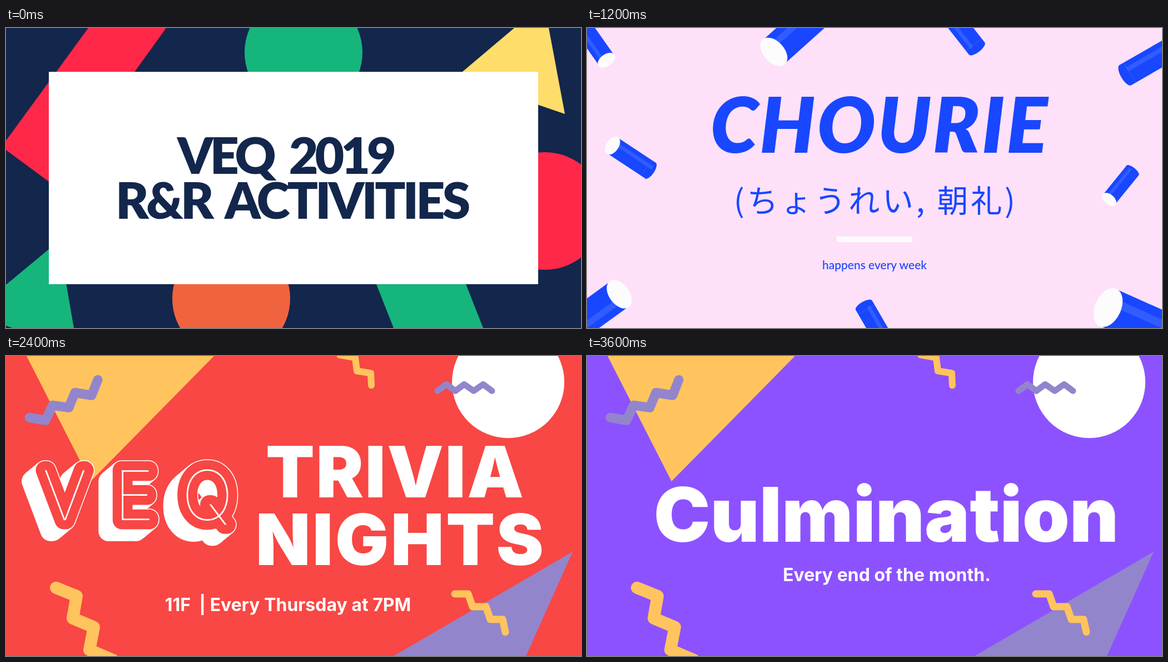
Write an HTML page that moves like this. It is 1034x541 px and loops after 4.2 s.

```html
<!DOCTYPE html>
<html lang="en">
<head>
<meta charset="utf-8">
<title>Monthly activities</title>
<style>
html, body { margin: 0; width: 100%; height: 100%; overflow: hidden; }
svg { display: block; width: 100vw; height: 100vh; }
.lato { font-family: Lato, sans-serif; font-weight: 900; }
.inter { font-family: Inter, sans-serif; font-weight: 700; }
.heavy { font-family: Inter, sans-serif; font-weight: 900; }
.script { font: italic bold 106px "Liberation Serif", serif; letter-spacing: -5px; }
.serif { font-family: "Liberation Serif", serif; }
.kana { font-family: "Noto Sans CJK JP", "Noto Sans CJK", sans-serif; }
</style>
</head>
<body>
<svg id="stage" viewBox="0 0 1034 541" preserveAspectRatio="none"></svg>
<script>
const SCENE_MS = 600;
const NAVY = '#13264c', BLUE = '#1847ff', BLACK = '#111', YELLOW = '#f2e500', LILAC = '#9385cc', AMBER = '#ffc45e';

const rect = (x, y, w, h, fill, more = '') => `<rect x="${x}" y="${y}" width="${w}" height="${h}" fill="${fill}" ${more}/>`;
const background = fill => rect(0, 0, 1034, 541, fill);
const ellipse = (x, y, rx, ry, fill, more = '') => `<ellipse cx="${x}" cy="${y}" rx="${rx}" ry="${ry}" fill="${fill}" ${more}/>`;
const circle = (x, y, r, fill, more) => ellipse(x, y, r, r, fill, more);
const poly = (points, fill) => `<polygon points="${points}" fill="${fill}"/>`;
const path = (d, fill) => `<path d="${d}" fill="${fill}"/>`;
const line = (d, color, width, more = '') => `<path d="${d}" fill="none" stroke="${color}" stroke-width="${width}" ${more}/>`;
const text = (x, y, size, style, fill, content, spacing = 0, more = '') =>
  `<text x="${x}" y="${y}" font-size="${size}" class="${style}" fill="${fill}" letter-spacing="${spacing}" ${more}>${content}</text>`;
const repeat = (n, draw) => Array.from({ length: n }, (_, i) => draw(i)).join('');

let seed = 11;
const random = (min = 0, max = 1) => {
  seed = (seed * 16807) % 2147483647;
  return min + (max - min) * seed / 2147483647;
};
const pick = list => list[Math.floor(random(0, list.length))];

function titleScene() {
  return background(NAVY) +
    poly('148,0 288,0 85,283 -8,214', '#ff2849') +
    circle(535, 44, 106, '#16b57c') +
    poly('914,0 976,0 1005,155 810,88', '#ffdd6b') +
    circle(969, 330, 106, '#ff2849') +
    poly('0,463 95,384 122,541 12,541 0,537', '#16b57c') +
    circle(405, 488, 106, '#f1633f') +
    poly('666,462 827,462 858,541 697,541', '#16b57c') +
    rect(77, 79, 880, 383, '#fff') +
    text(502, 263, 91, 'lato', NAVY, 'VEQ 2019', -6, 'text-anchor="middle" word-spacing="14"') +
    text(197, 344, 91, 'lato', NAVY, 'R&amp;R ACTIVITIES', -4.8, 'word-spacing="11"');
}

function purpleScene() {
  return background('#e1c2e0') + circle(901, 270, 228, '#a88aa2') +
    text(22, 102, 92, 'lato', '#9c879b', 'March is') +
    text(22, 252, 166, 'lato', '#fff', 'PURPLE', -7) +
    text(25, 391, 158, 'lato', '#fff', 'month', 1) +
    text(25, 451, 33, 'inter', '#857187', 'Celebrating Diversity and') +
    text(26, 496, 33, 'inter', '#857187', 'Woman Empowerment', 1);
}

// A rod starts at its near end and runs along the given angle.
function rod(x, y, angle, length, width, whiteEnd) {
  const r = width / 2, e = r * 0.65;
  return `<g transform="translate(${x} ${y}) rotate(${angle})">` +
    rect(0, -r, length, width, BLUE) +
    ellipse(length, 0, e * 0.6, r, BLUE) +
    rect(0, -r * 0.55, length, r * 0.4, '#315cff') +
    line(`M${length - 9} ${-r}v${width}`, '#315cff', 0.7) +
    (whiteEnd ? ellipse(0, 0, e, r + 1, '#fcfcfc')
              : ellipse(0, 0, e * 0.6, r, BLUE) + line(`M9 ${-r}v${width}`, '#4167f4', 0.7)) + '</g>';
}

function chourieScene() {
  return background('#ffe0f9') +
    rod(35, 58, 235, 100, 33, true) + rod(336, 43, 318, 160, 58, true) +
    rod(701, 37, 232, 90, 36, false) + rod(968, 85, 330, 110, 42, false) +
    rod(46, 212, 33.5, 82, 34, true) + rod(939, 309, 309, 67, 28, true) +
    rod(58, 480, 144, 120, 56, true) + rod(498, 500, 60, 90, 34, false) +
    rod(937, 504, 24, 140, 72, true) +
    text(222, 225, 138, 'lato', BLUE, 'CHOURIE', 3.4, 'font-style="italic"') +
    text(264, 332, 56, 'kana', BLUE, '(ちょうれい, 朝礼)', 4.8, 'lang="ja"') +
    rect(449, 376, 136, 10, '#fcfcfc') +
    text(517, 435, 21, 'lato', BLUE, 'happens every week', 0, 'text-anchor="middle" style="font-weight:500"');
}

function tomato([x, y, r]) {
  return circle(x, y, r, '#dd3212') + circle(x, y, r * 0.82, '#f0622b') +
    repeat(3, i => ellipse(x, y - r * 0.42, r * 0.38, r * 0.23, '#d9440f', `transform="rotate(${i * 120 + x} ${x} ${y})"`));
}

function potluckScene() {
  const cx = 262, cy = 226;
  const spots = (count, minR, maxR, size, colors, opacity) => repeat(count, () => {
    const radius = Math.sqrt(random(minR ** 2, maxR ** 2)), angle = random(0, 2 * Math.PI);
    const x = cx + radius * Math.cos(angle), y = cy + radius * Math.sin(angle);
    return ellipse(x, y, random(size / 3, size), random(size / 4, size * 0.7), pick(colors),
      `opacity="${opacity}" transform="rotate(${random(0, 180)} ${x} ${y})"`);
  });
  const wood = repeat(230, () =>
    line(`M${random(250, 800)} ${random(0, 541)}q${random(60, 160)} ${random(-10, 10)} 260 0t260 ${random(-5, 5)}`,
      pick(['#3d200e', '#553016', '#9b6b3e', '#ad8050']), random(0.5, 2.5), `opacity="${random(0.2, 0.6)}"`));
  const peppers = [
    'M286 0q3 70 53 76', 'M406 4q-8 38-34 68', 'M155 66l28 36', 'M200 92q60-25 66 52', 'M86 134q55-25 86 10 17 20 15 40',
    'M322 160q12-45 49-44', 'M472 92q-35 38-96 55', 'M262 188q50 42 116 14', 'M108 184l50 6', 'M365 235q-2 50 101 6',
    'M90 334q25-50 78-66', 'M120 364q75-5 87-78', 'M318 315q-67 38 0 120', 'M418 310q55-2 90-20', 'M436 328q-45 55 42 101',
    'M382 378q16 54-8 85', 'M0 317q70-1 78-33', 'M221 371q35 25-7 74l-36 11', 'M268 280l2 25', 'M304 265q22 12 43-15'
  ];
  const tomatoes = [
    [129, 46, 32], [331, 17, 28], [205, 122, 33], [299, 100, 29], [443, 66, 30], [83, 201, 29], [154, 220, 32], [374, 177, 27],
    [389, 261, 26], [498, 257, 30], [170, 301, 30], [255, 336, 30], [79, 363, 30], [361, 359, 29], [244, 445, 31], [424, 438, 28]
  ];
  return '<defs><linearGradient id="wood" x2="0" y2="1"><stop stop-color="#8a5c33"/><stop offset="1" stop-color="#603a1c"/></linearGradient>' +
    '<radialGradient id="shadow"><stop offset=".84" stop-color="#1c0d05"/><stop offset="1" stop-color="#1c0d05" stop-opacity="0"/></radialGradient>' +
    '<radialGradient id="crust"><stop offset=".84" stop-color="#d9b374"/><stop offset=".93" stop-color="#e6c688"/><stop offset="1" stop-color="#ad6c28"/></radialGradient></defs>' +
    background('url(#wood)') + wood +
    circle(cx - 8, cy + 20, 395, 'url(#shadow)', 'opacity=".75"') + circle(cx, cy, 343, 'url(#crust)') +
    spots(120, 303, 334, 18, ['#a55b21', '#c98c43', '#6a3514', '#f3dca9', '#e9cb8f'], 0.75) +
    circle(cx, cy, 297, '#dcc59b') +
    spots(130, 60, 292, 30, ['#c98d7a', '#b09a66', '#a9675c', '#cfae72', '#8f7048'], 0.55) +
    spots(190, 0, 278, 36, ['#f1e5ca', '#f6edd8', '#e9d9b4'], 0.75) +
    spots(120, 60, 295, 14, ['#b87566', '#c9a468', '#94804d', '#e8d3a2'], 0.6) +
    spots(140, 20, 295, 6, ['#6b5134', '#c58c42', '#8d793f', '#302923'], 0.7) +
    line('M8 90l45 20M525 190l78-20M70 418l35 12M350 510v31M540 398l35 10M138 472l-20 40', '#80502a', 3, 'opacity=".7"') +
    line(peppers.join(''), '#d9240f', 8, 'stroke-linecap="round"') +
    tomatoes.map(tomato).join('') +
    circle(265, 239, 36, '#e62310') + line('M240 215q35 18 51 52M280 210q-25 25-22 61', '#a51209', 5) +
    text(623, 254, 83, 'heavy', '#fff', 'POTLUCK', -1) +
    rect(838, 327, 180, 11, '#ff4545') +
    text(1018, 377, 26, 'inter', '#fff', 'ONCE A MONTH', 0.2, 'text-anchor="end"');
}

function confetti(fill) {
  const zigzag = (points, color, width) => line('M' + points, color, width, 'stroke-linejoin="round" stroke-linecap="round"');
  return background(fill) +
    poly('37,0 374,0 152,226', AMBER) + circle(903, 47, 101, '#fff') + poly('1019,353 935,541 697,541', LILAC) +
    zigzag('42 111L71 116 84 89 113 93 124 66 154 71 165 43', LILAC, 17) +
    zigzag('600-2L628 3 631 27 656 31 657 53', AMBER, 12) +
    zigzag('776 63L792 51 808 63 824 51 841 63 858 51 874 63', LILAC, 11) +
    zigzag('90 418L127 433 120 473 158 489 150 530 192 548', AMBER, 22) +
    zigzag('807 429L831 429 839 452 863 452 871 475 893 475 898 498', AMBER, 13);
}

function triviaScene() {
  const red = '#f84744';
  const block = (dx, dy, color, width) => text(66 + dx, 296 + dy, 124, 'inter', color, 'VEQ', 49,
    `style="font-weight:100" stroke="${color}" stroke-width="${width}" stroke-linejoin="round"`);
  return confetti(red) +
    repeat(25, i => block(i - 24, (24 - i) * 0.83, '#fff', 36)) + block(0, 0, red, 33) + block(0, 0, '#fff', 0) +
    text(467, 255, 128, 'heavy', '#fff', 'TRIVIA', 2.5) +
    text(449, 377, 128, 'heavy', '#fff', 'NIGHTS', 3.5) +
    text(507, 460, 32, 'inter', '#fff', '11F&#160; | Every Thursday at 7PM', 0, 'text-anchor="middle"');
}

function icons() {
  const spokes = (x, y, from, to, color, width, cap = 'butt') => repeat(6, i =>
    line(`M${x} ${y - from}V${y - to}`, color, width, `stroke-linecap="${cap}" transform="rotate(${i * 60} ${x} ${y})"`));
  const pin = path('M53 114C46 95 25 75 25 57A28 28 0 0 1 81 57C81 75 60 95 53 114Z', BLACK) + circle(53, 57, 10, YELLOW);
  const compass = circle(152, 52, 37, BLACK) + circle(152, 52, 30, '#cfcfcf') +
    line('M152 22v6M152 76v6M122 52h6M176 52h6', BLACK, 4) +
    poly('152,25 160,52 144,52', BLACK) + poly('152,79 160,52 144,52', '#fff') + circle(152, 52, 5, BLACK);
  const heart = path('M267 61C256 52 246 45 246 34C246 21 262 19 267 29C272 19 288 21 288 34C288 45 278 52 267 61Z', BLACK);
  const gear = spokes(240, 96, 20, 33, '#222', 10) + circle(240, 96, 21, 'none', 'stroke="#222" stroke-width="10"') +
    circle(240, 96, 21, 'none', 'stroke="#555" stroke-width="2"');
  const pipe = line('M299 70H320Q345 70 345 97', BLACK, 14) +
    path('M336 106V148C336 198 411 198 411 148V134H372V148C372 160 356 160 356 148V106Z', BLACK) +
    rect(332, 94, 28, 14, '#fff', 'rx="4"') + rect(372, 127, 39, 7, '#fff');
  const wheel = circle(390, 61, 20, 'none', `stroke="${BLACK}" stroke-width="5"`) +
    spokes(390, 61, 0, 29, BLACK, 2.5) + spokes(390, 61, 24, 31, BLACK, 4, 'round') +
    circle(390, 61, 7, BLACK) + circle(390, 61, 2.5, YELLOW);
  const bubble = ellipse(136, 127, 36, 26, BLACK) + poly('150,149 163,141 169,153', BLACK);
  const cube = poly('262,149 292,135 322,149 292,161', '#aaa') + poly('262,149 292,161 292,190 262,178', '#606060') +
    poly('322,149 292,161 292,190 322,178', '#494949');
  const puzzle = rect(32, 175, 65, 66, BLACK) + ellipse(64, 163, 12, 7, BLACK) + ellipse(64, 252, 12, 7, BLACK) +
    rect(58, 163, 12, 90, BLACK) + ellipse(44, 208, 7, 12, YELLOW) + ellipse(86, 208, 7, 12, YELLOW) +
    rect(32, 203, 10, 10, YELLOW) + rect(88, 203, 10, 10, YELLOW);
  const ring = circle(161, 227, 26, 'none', 'stroke="#fff" stroke-width="5"') + poly('150,182 161,186 172,182 179,190 161,207 143,190', BLACK);
  const fork = path('M211 156h3v25h3v-25h3v25h2v-25h3v25h3v-25h3v32q0 10-7 12l4 90q0 7-7 7t-7-7l4-90q-7-2-7-12Z', BLACK);
  const tack = rect(278, 276, 5, 22, '#aaa') + ellipse(281, 262, 26, 17, BLACK) + ellipse(281, 257, 24, 13, '#292929') +
    path('M270 232h22l-2 28q-9 6-18 0Z', BLACK) + ellipse(281, 227, 20, 14, BLACK) + ellipse(281, 223, 18, 9, '#292929');
  const bottle = path('M26 284H128C146 284 149 301 162 305H187V333H162C149 337 146 353 128 353H26Q22 353 22 349V288Q22 284 26 284Z', '#fff') +
    rect(172, 298, 15, 42, '#ddd', 'rx="6"') + rect(172, 309, 15, 19, '#555') + path('M187 306l8-3v31l-8-3Z', BLACK) +
    path('M30 319h19v10h86l6-10h18v4h-14q-4 22-18 22H40V335l-10-6Z', BLACK) +
    path('M62 302q15-4 29 0 6 11 0 22H62q7-11 0-22ZM96 302q15-4 29 0 6 11 0 22H96q7-11 0-22Z', BLACK) +
    line('M77 292v40M111 292v40', BLACK, 3) + path('M64 292h13v7H64ZM98 292h13v7H98Z', BLACK) +
    repeat(4, i => circle(60 + i * 17, 336, 3, '#777'));
  return pin + compass + heart + gear + pipe + wheel + bubble + cube + puzzle + ring + fork + tack + bottle;
}

function challengeScene() {
  return background(YELLOW) + icons() +
    `<text x="428" y="220" class="script" fill="${BLACK}">VEQ Monthly</text>` +
    `<text x="596" y="347" class="script" fill="${BLACK}">Challenge</text>` +
    text(703, 424, 35, 'serif', BLACK, 'EVERY MONTH.', 3.4);
}

function culminationScene() {
  return confetti('#8c52ff') +
    text(120, 335, 136, 'heavy', '#fff', 'Culmination') +
    text(539, 406, 32, 'inter', '#fff', 'Every end of the month.', 0, 'text-anchor="middle"');
}

const stage = document.getElementById('stage');
stage.innerHTML = [titleScene, purpleScene, chourieScene, potluckScene, triviaScene, challengeScene, culminationScene]
  .map(scene => `<g visibility="hidden">${scene()}</g>`).join('');
const scenes = [...stage.children];

function render() {
  const current = Math.floor(performance.now() / SCENE_MS) % scenes.length;
  scenes.forEach((scene, i) => scene.setAttribute('visibility', i === current ? 'visible' : 'hidden'));
  requestAnimationFrame(render);
}
render();
</script>
</body>
</html>
```
